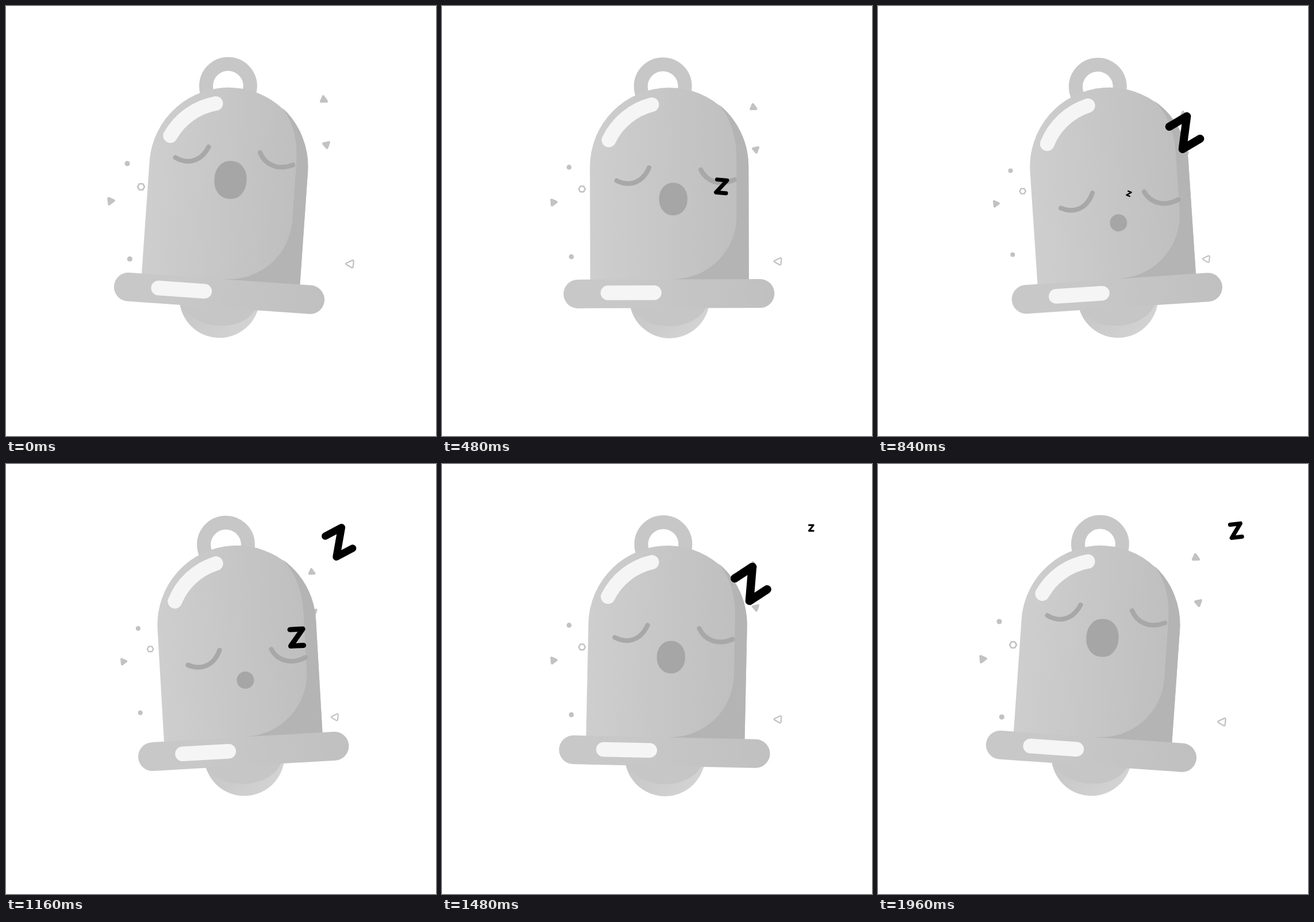
Recreate the animation shown at these times as an HTML page. Size 748 by 748 pixels, loop 2 s.

```html
<!DOCTYPE html>
<html lang="en">
<head>
<meta charset="utf-8">
<title>Sleeping bell</title>
<style>
html, body { margin: 0; width: 100%; height: 100%; overflow: hidden; background: #fff; }
svg { display: block; width: 100vw; height: 100vh; }
</style>
</head>
<body>
<svg viewBox="0 0 748 748" stroke-linecap="round" stroke-linejoin="round">
  <defs>
    <linearGradient id="bodyFill" gradientUnits="userSpaceOnUse" x1="257" y1="0" x2="533" y2="0">
      <stop stop-color="#cecece"/><stop offset="1" stop-color="#bebebe"/>
    </linearGradient>
    <linearGradient id="rimFill" gradientUnits="userSpaceOnUse" x1="211" y1="0" x2="577" y2="0">
      <stop stop-color="#c8c8c8"/><stop offset=".3" stop-color="#c8c8c8"/><stop offset="1" stop-color="#c0c0c0"/>
    </linearGradient>
    <linearGradient id="clapperFill" gradientUnits="userSpaceOnUse" x1="345" y1="500" x2="440" y2="570">
      <stop stop-color="#c6c6c6"/><stop offset="1" stop-color="#d3d3d3"/>
    </linearGradient>
    <path id="zed" d="M-.5-.64H.5L-.5.64H.5" fill="none" stroke="#000" stroke-width=".4"/>
  </defs>

  <g id="bits" fill="#c2c2c2" stroke="#c2c2c2">
    <g stroke="none">
      <circle cx="211" cy="274" r="4.6"/>
      <circle cx="215.3" cy="440" r="4.6"/>
    </g>
    <path d="M241 314.5l-3 5.2h-6l-3-5.2 3-5.2h6z" fill="none" stroke-width="2.6"/>
    <g stroke-width="4.6">
      <path d="M178.5 334.5L187.5 338.5 179.5 344.5z"/>
      <path d="M552 157.5L557.8 165.800 548.2 166z"/>
      <path d="M552.3 239.6L561.5 237.4 558.3 246.5z"/>
    </g>
    <path d="M591.5 447.5L602.5 442.3Q604.8 442 604.7 444L603.8 453.5Q603.3 456 600.8 454.8L592.5 450Q590.5 448.5 591.5 447.5z" fill="none" stroke-width="2.4"/>
  </g>

  <g id="bell">
    <circle cx="384.3" cy="139.8" r="38.4" fill="none" stroke="#c7c7c7" stroke-width="24"/>
    <circle cx="395" cy="508" r="70" fill="url(#clapperFill)"/>
    <ellipse cx="394" cy="511" rx="67" ry="46" fill="#c6c6c6"/>
    <path d="M257 477V280A138 138 0 0 1 533 280V477z" fill="url(#bodyFill)"/>
    <path d="M481 171C502 195 512 228 512 264V365A110 110 0 0 1 402 475V477H533V280A138 138 0 0 0 481 171z" fill="#b4b4b4"/>
    <rect x="210.5" y="475.5" width="367" height="50" rx="25" fill="url(#rimFill)"/>
    <rect x="275" y="486" width="106" height="25.5" rx="12.75" fill="#f5f5f5"/>
    <path d="M290 233A114 114 0 0 1 365 171.5" fill="none" stroke="#f5f5f5" stroke-width="25"/>
    <g id="face">
      <g fill="none" stroke="#a8a8a8" stroke-width="8.2">
        <path d="M301.3 270.2C323 281 346 275 357.8 247.7"/>
        <path d="M447.8 251.4C457 271 480 281 506.2 268.9"/>
      </g>
      <rect id="mouth" fill="#a6a6a6"/>
    </g>
  </g>

  <use id="z0" href="#zed"/>
  <use id="z1" href="#zed"/>
</svg>
<script>
const LOOP = 2000, STEP = 40, TURN = 980;
const el = id => document.getElementById(id);
const clamp = v => Math.min(1, Math.max(0, v));
const mix = (a, b, p) => a + (b - a) * p;
const smooth = p => p * p * (3 - 2 * p);

// Cubic bezier easing with control heights 0 and 1
function ease(x1, x2, p) {
  let lo = 0, hi = 1;
  for (let i = 0; i < 24; i++) {
    const t = (lo + hi) / 2, r = 1 - t;
    if (3 * t * r * r * x1 + 3 * t * t * r * x2 + t * t * t < p) lo = t; else hi = t;
  }
  return smooth(lo);
}

// Flight of one Z: age in ms, x, y, size, angle
const FLIGHT = [
  [140, 420, 328, 0, 28],
  [240, 436.5, 326.5, 5.8, 22],
  [480, 486.3, 313.8, 17.5, 5],
  [560, 505.8, 301.8, 22.3, -3],
  [860, 535.5, 214.5, 36, -32],
  [1040, 554, 160.5, 36.5, -36],
  [1160, 579.2, 136, 32, -28],
  [1360, 622.8, 116, 18, -7],
  [1480, 642.3, 111.3, 7.7, 0],
  [1560, 652, 109, 0, 4]
];

function slope(i, c) {
  const a = FLIGHT[Math.max(0, i - 1)], b = FLIGHT[Math.min(FLIGHT.length - 1, i + 1)];
  return (b[c] - a[c]) / (b[0] - a[0]);
}

function flight(age, c) {
  const i = FLIGHT.findIndex(k => k[0] > age) - 1;
  const a = FLIGHT[i], b = FLIGHT[i + 1], span = b[0] - a[0], p = (age - a[0]) / span;
  return mix(a[c], b[c], smooth(p))
    + span * p * (1 - p) * ((1 - p) * slope(i, c) - p * slope(i + 1, c));
}

function drawZ(node, age) {
  const on = age > FLIGHT[0][0] && age < FLIGHT[FLIGHT.length - 1][0];
  node.style.display = on ? "" : "none";
  if (!on) return;
  const [x, y, size, turn] = [1, 2, 3, 4].map(c => flight(age, c));
  node.setAttribute("transform", `translate(${x} ${y}) rotate(${turn}) scale(${Math.max(0, size)})`);
}

function draw(t) {
  // Most parts run out and back, mirrored around TURN
  const there = Math.min(t, 2 * TURN - t), p = clamp(there / TURN);

  const k = 1 - 0.1275 * smooth(p);
  el("bits").setAttribute("transform", `translate(373 378) scale(${k}) translate(-373 -378)`);

  const swing = t < TURN
    ? ease(0.58, 0.37, p)
    : 1 - ease(0.42, 0.4, clamp((t - TURN) / TURN));
  el("bell").setAttribute("transform", `rotate(${mix(4, -3.95, swing)} 393.5 170)`);

  const drop = ease(0.66, 0.38, p);
  el("face").setAttribute("transform", `translate(${5 * drop} ${77.6 * drop})`);

  const close = smooth(clamp((there - 320) / 480));
  const rx = mix(28, 15, close), ry = mix(33, 15, close), round = mix(0.93, 1, close);
  const box = { x: 399.7 - rx, y: 302.4 - ry, width: 2 * rx, height: 2 * ry, rx: rx * round, ry: ry * round };
  for (const key in box) el("mouth").setAttribute(key, box[key]);

  drawZ(el("z0"), t);
  drawZ(el("z1"), t - 600);
}

const start = performance.now();
function tick() {
  const t = (performance.now() - start) % LOOP;
  draw(Math.floor(t / STEP) * STEP);
  requestAnimationFrame(tick);
}
tick();
</script>
</body>
</html>
```
